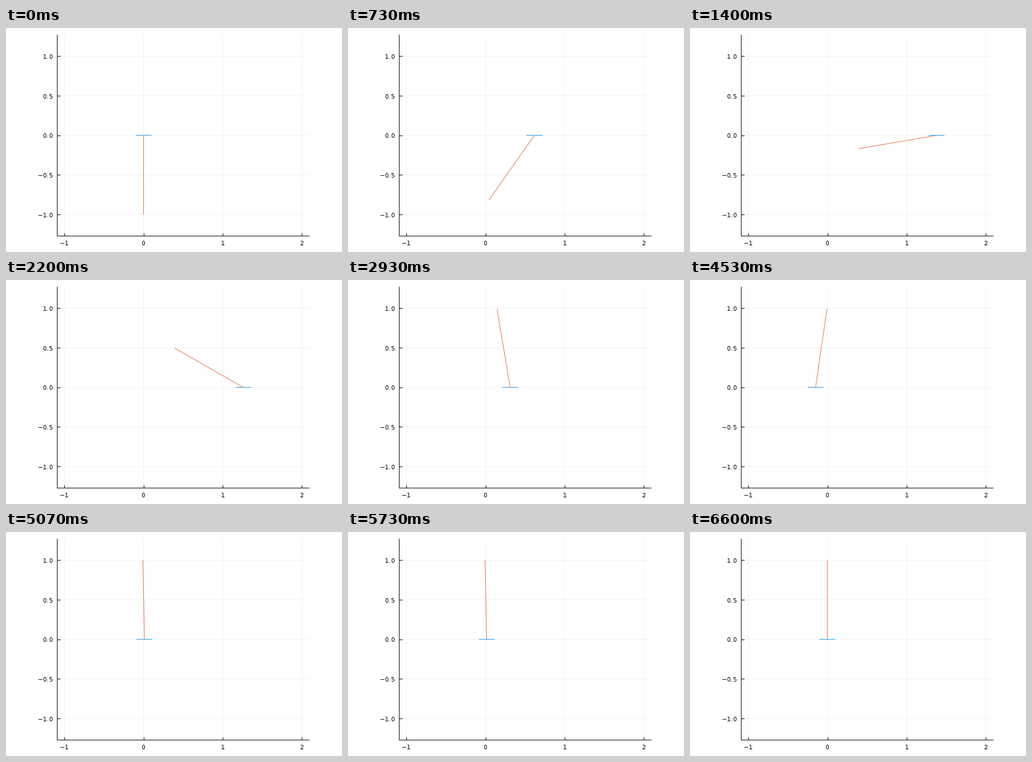
Animation, 600 px wide and 400 px high, one loop 6740 ms. Source, as a matplotlib script:

```python
import numpy as np
import matplotlib.pyplot as plt
from matplotlib.animation import FuncAnimation

W, H, DPI = 600, 400, 100
PX = 72 / DPI                            # one pixel in points
LEFT, TOP, RIGHT, BOTTOM = 91.2, 11.8, 541.2, 371.2
X0, Y0, SCALE = 245.6, 191.75, 141.4     # pixel position of (0, 0) and unit size

LOOP_MS, TICK_MS = 6740, 20
RATE, LAST = 15, 99                      # simulation steps per second, final step

# Cart position, cart speed, pole angle from hanging, pole rate, every 11 steps
UP = np.pi
SPAN = 11
STATES = np.array([
    (0.000, 0.0000, 0.000, 0.0000),
    (0.617, 0.1140, 0.613, 0.1080),
    (1.407, 0.0250, 1.461, 0.0580),
    (1.260, -0.0520, 2.090, 0.0590),
    (0.311, -0.1080, UP - 0.166, 0.0965),
    (-0.354, -0.0215, UP + 0.379, 0.0165),
    (-0.219, 0.0360, UP + 0.207, -0.0325),
    (0.0165, 0.0031, UP - 0.025, -0.0032),
    (0.011, -0.0014, UP - 0.016, 0.0017),
    (-0.003, -0.0006, UP + 0.001, 0.0008),
])


def hermite(p, v, q, w, s):
    """Cubic from p to q with end speeds v and w, at s in 0..1."""
    v, w = v * SPAN, w * SPAN
    return p + s * (v + s * (3 * (q - p) - 2 * v - w + s * (2 * (p - q) + v + w)))


def pose(step):
    j = min(step // SPAN, len(STATES) - 2)
    a, b = STATES[j], STATES[j + 1]
    s = step / SPAN - j
    return hermite(*a[:2], *b[:2], s), hermite(*a[2:], *b[2:], s)


plt.rcParams.update({
    "font.family": "DejaVu Sans",
    "text.hinting": "default",
    "text.hinting_factor": 1,
})
fig = plt.figure(figsize=(W / DPI, H / DPI), dpi=DPI, facecolor="white")
ax = fig.add_axes([LEFT / W, 1 - BOTTOM / H, (RIGHT - LEFT) / W, (BOTTOM - TOP) / H])
ax.set_xlim((LEFT - X0) / SCALE, (RIGHT - X0) / SCALE)
ax.set_ylim((Y0 - BOTTOM) / SCALE, (Y0 - TOP) / SCALE)
ax.set_xticks([-1, 0, 1, 2])
ax.set_yticks([-1, -0.5, 0, 0.5, 1])
ax.set_axisbelow(True)
ax.grid(color="black", alpha=0.055, linewidth=PX, snap=False)
ax.spines[["top", "right"]].set_visible(False)
ax.spines[["left", "bottom"]].set_linewidth(PX)
ax.tick_params(direction="in", length=5.5 * PX, width=PX, labelsize=8)
ax.tick_params(axis="x", pad=7.4 * PX)
ax.tick_params(axis="y", pad=7.2 * PX)

style = dict(linewidth=PX, solid_capstyle="butt", snap=False)
cart, = ax.plot([], [], color="#009afa", **style)
pole, = ax.plot([], [], color="#e26f46", **style)


def draw(i):
    step = min(int((i * TICK_MS + 15) * RATE / 1000), LAST)
    x, angle = pose(step)
    cart.set_data([x - 0.1, x + 0.1], [0, 0])
    pole.set_data([x, x - np.sin(angle)], [0, -np.cos(angle)])
    return cart, pole


anim = FuncAnimation(fig, draw, frames=LOOP_MS // TICK_MS, interval=TICK_MS,
                     repeat=True, repeat_delay=0, blit=False)
plt.show()
```
